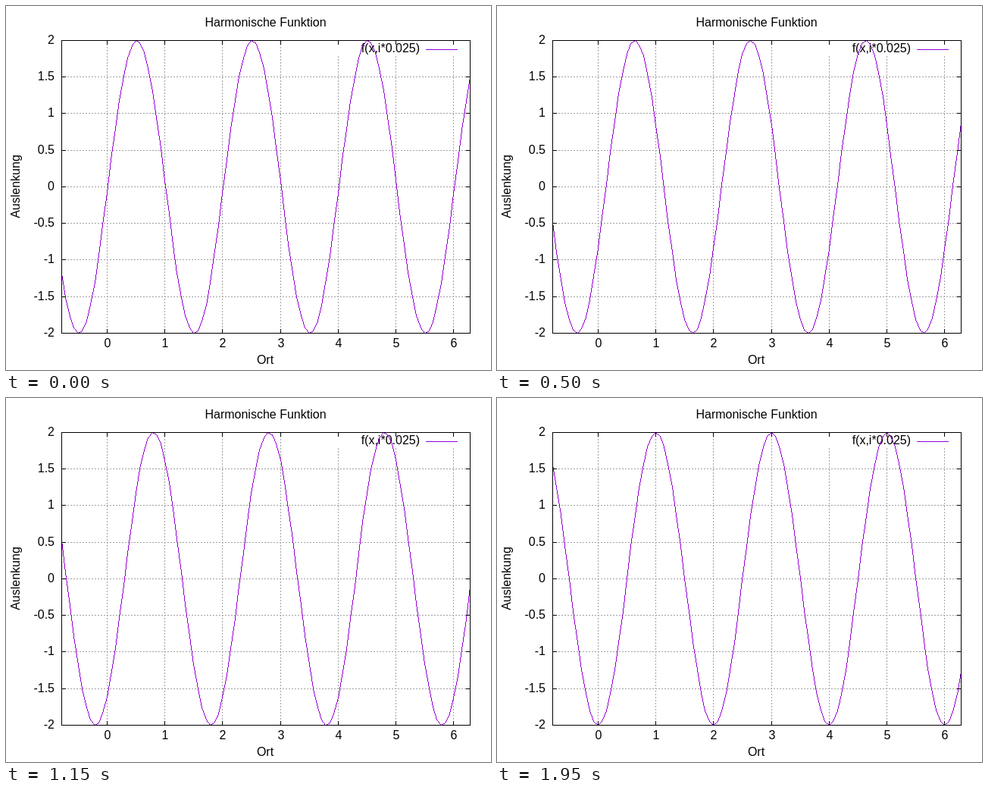
Write an HTML page with a canvas that moves like this. It is 640 px wide and 480 px high and loops after 2000 ms.

```html
<!DOCTYPE html>
<html lang="de">
<head>
<meta charset="utf-8">
<title>Harmonische Funktion</title>
<style>
html, body { margin: 0; width: 100%; height: 100%; overflow: hidden; background: #fff; }
canvas { display: block; }
</style>
</head>
<body>
<canvas id="stage" width="640" height="480"></canvas>
<script>
const ctx = document.getElementById('stage').getContext('2d');
const LEFT = 73, RIGHT = 612, TOP = 45, BOTTOM = 431;
const X_MIN = -Math.PI / 4, X_MAX = 2 * Math.PI;
const SAMPLES = 100, STEP_MS = 50, STEPS = 40, TICK = 5;
const PURPLE = '#9400d3', GRAY = '#a0a0a0';

const px = x => Math.round(LEFT + (x - X_MIN) / (X_MAX - X_MIN) * (RIGHT - LEFT));
const py = y => 479 - Math.round(48 + (y + 2) / 4 * (BOTTOM - TOP));
const xTicks = [0, 1, 2, 3, 4, 5, 6];
const yTicks = [-2, -1.5, -1, -0.5, 0, 0.5, 1, 1.5, 2];

// Crisp one-pixel line without antialiasing; gap > 0 makes it dotted
function line(x0, y0, x1, y1, color, gap = 0) {
  ctx.fillStyle = color;
  const n = Math.max(Math.abs(x1 - x0), Math.abs(y1 - y0));
  for (let k = 0; k <= n; k++) {
    if (gap && k % (2 + gap) > 1) continue;
    const t = n ? k / n : 0;
    ctx.fillRect(Math.round(x0 + (x1 - x0) * t), Math.round(y0 + (y1 - y0) * t), 1, 1);
  }
}

function text(s, x, y, align = 'center') {
  ctx.fillStyle = '#000';
  ctx.textAlign = align;
  ctx.fillText(s, x, y);
}

function drawBack() {
  ctx.fillStyle = '#fff';
  ctx.fillRect(0, 0, 640, 480);
  ctx.font = '16px "Liberation Sans", Arial, sans-serif';
  for (const v of yTicks) {
    line(LEFT, py(v), RIGHT, py(v), GRAY, 2);
    text(v, 64, py(v) + 5, 'right');
  }
  for (const v of xTicks) {
    // the grid leaves room for the key
    line(px(v), BOTTOM, px(v), v > 3 ? 66 : TOP, GRAY, 2);
    text(v, px(v) + 1, 450);
  }
  text('Harmonische Funktion', 342.5, 27);
  text('Ort', 342, 472);
  ctx.save();
  ctx.translate(18, 238);
  ctx.rotate(-Math.PI / 2);
  text('Auslenkung', 0, 0);
  ctx.restore();
  text('f(x,i*0.025)', 546, 61, 'right');
  line(554, 57, 595, 57, PURPLE);
}

function drawCurve(shift) {
  let last;
  for (let k = 0; k < SAMPLES; k++) {
    const x = X_MIN + (X_MAX - X_MIN) * k / (SAMPLES - 1);
    const point = [px(x), py(2 * Math.sin(Math.PI * (x - shift)))];
    if (last) line(...last, ...point, PURPLE);
    last = point;
  }
}

function drawFrame() {
  for (const v of yTicks) {
    line(LEFT, py(v), LEFT + TICK, py(v), '#000');
    line(RIGHT - TICK, py(v), RIGHT, py(v), '#000');
  }
  for (const v of xTicks) {
    line(px(v), BOTTOM, px(v), BOTTOM - TICK, '#000');
    line(px(v), TOP, px(v), TOP + TICK, '#000');
  }
  ctx.strokeStyle = '#000';
  ctx.lineWidth = 1;
  ctx.strokeRect(LEFT + 0.5, TOP + 0.5, RIGHT - LEFT, BOTTOM - TOP);
}

function draw() {
  const i = Math.floor(performance.now() / STEP_MS) % STEPS + 1;
  drawBack();
  drawCurve(i * 0.0125);
  drawFrame();
  requestAnimationFrame(draw);
}
draw();
</script>
</body>
</html>
```
